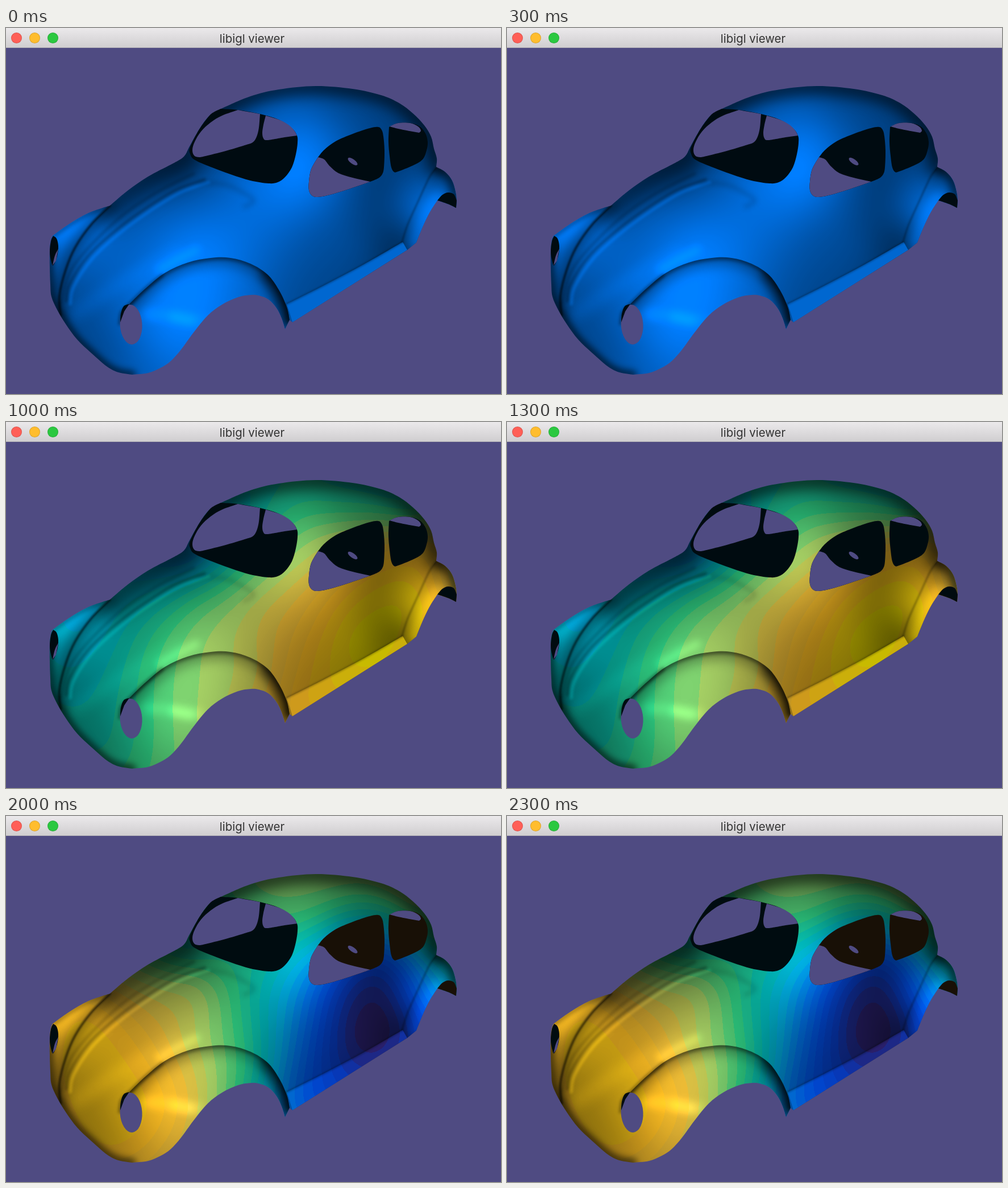
An HTML page with a canvas that plays this animation: 871 by 643 pixels, repeating every 2500 ms.

```html
<!DOCTYPE html>
<html lang="en">
<head>
<meta charset="utf-8">
<title>libigl viewer</title>
<style>
html, body { margin: 0; width: 100%; height: 100%; overflow: hidden; background: #4f4b82; }
canvas { position: absolute; left: 0; top: 0; }
.bar { position: absolute; left: 0; top: 0; width: 871px; height: 34px; background: linear-gradient(#ebe9eb, #d0ced0); border-bottom: 1px solid #b4b2b6; }
.bar i { position: absolute; top: 8px; width: 17px; height: 17px; border-radius: 50%; border: 1px solid #0002; background-clip: border-box; }
.bar span { position: absolute; left: 0; width: 866px; top: 5px; text-align: center; font: 20.4px/27px Inter, sans-serif; color: #333; }
</style>
</head>
<body>
<canvas id="stage" width="871" height="643"></canvas>
<div class="bar">
  <i style="left:9px;background:#ff5f57"></i>
  <i style="left:41px;background:#ffbd2e"></i>
  <i style="left:73px;background:#2bc840"></i>
  <span>libigl viewer</span>
</div>
<script>
const W = 871, H = 643, STEP = 500, BANDS = 28, UNIT = 170, BG = '#4f4b82';

function layer() {
  const c = document.createElement('canvas');
  c.width = W; c.height = H;
  return c.getContext('2d');
}

// Smooth runs of points, joined by corners.
function shape(...runs) {
  const path = new Path2D();
  runs.forEach((a, r) => {
    const n = a.length / 2;
    const at = i => { i = Math.max(0, Math.min(n - 1, i)); return [a[2 * i], a[2 * i + 1]]; };
    r ? path.lineTo(a[0], a[1]) : path.moveTo(a[0], a[1]);
    for (let i = 0; i < n - 1; i++) {
      const p = at(i - 1), q = at(i), s = at(i + 1), t = at(i + 2);
      path.bezierCurveTo(q[0] + (s[0] - p[0]) / 6, q[1] + (s[1] - p[1]) / 6,
        s[0] - (t[0] - q[0]) / 6, s[1] - (t[1] - q[1]) / 6, s[0], s[1]);
    }
  });
  return path;
}

function oval(...args) {
  const path = new Path2D();
  path.ellipse(...args, 0, 7);
  return path;
}

// Outlines
const leftTop = [82,365, 110,345, 145,325, 183,312];
const hoodTop = [183,312, 215,285, 250,261, 290,240, 308,230, 316,222, 323,208, 340,178, 357,155, 378,142];
const roof = [378,142, 430,120, 480,108, 545,102, 610,107, 660,118, 692,132, 716,150, 736,171, 748,191, 753,212, 758,229, 757,244];
const rearTop = [757,244, 773,253, 785,268, 791,287, 793,303, 792,316];
const rearArch = [759,303, 745,325, 733,350, 722,377];
const wheelArch = [491,529, 485,510, 476,492, 462,477, 445,470, 430,469, 408,473, 380,486, 355,505, 330,535, 308,565, 290,585, 272,597, 250,606, 222,609];
const nose = [222,609, 198,605, 178,595, 150,571, 125,547, 105,520, 90,495, 80,472, 78,450, 77,420, 77,390, 79,373, 82,365];
const hoodEdge = [183,312, 150,345, 122,385, 105,425, 94,470, 96,505];
const crease = [215,487, 245,458, 280,430, 320,412, 360,404, 395,404, 430,414, 460,433, 480,460, 494,490, 499,513];
const ridge = [106,480, 112,450, 145,400, 195,354, 250,314, 300,284, 350,266];
const sillTop = [494,485, 560,452, 630,415, 698,376];
const rearSeam = [697,376, 707,345, 725,305, 745,262, 757,244];

const body = shape(leftTop, hoodTop, roof, rearTop, [792,316, 777,309, 759,303], rearArch, [706,390], [504,517], [499,513], wheelArch, nose);
const fender = shape(crease, wheelArch, [205,606, 190,560, 195,520, 215,487]);
const leftFender = shape(leftTop, hoodEdge, nose.slice(12));
const rearFender = shape(rearTop, rearArch, [706,390], rearSeam);
const sill = shape(sillTop, [706,390], [504,517], [499,500]);

const windshield = shape([378,142, 408,144, 447,151, 480,161, 503,176, 512,189, 513,202, 510,222, 503,245, 491,262, 478,271, 462,273, 430,268, 395,257, 355,242, 331,231, 324,221, 324,209, 340,178, 357,155, 367,147, 378,142]);
const paneLeft = shape([408,144, 447,151], [447,151, 445,175, 441,191, 434,201, 420,206, 390,215, 355,224, 340,227, 331,224, 328,214, 332,200, 343,182, 360,166, 380,154, 408,144]);
const paneRight = shape([457,154, 480,161, 497,170, 507,180, 512,189], [490,192, 460,197, 453,194, 451,184, 453,170, 457,154]);
const sideLow = [641,270, 600,284, 570,293, 548,297, 538,294, 533,285, 533,270, 537,248, 549,227];
const sideWin = shape([549,227, 560,214, 580,199, 610,186, 640,176, 655,174, 661,179, 664,190, 666,215, 665,245, 662,257, 655,264, 641,270], sideLow);
const sideGap = shape([549,227, 560,231, 570,243, 585,255, 610,263, 641,270], sideLow);
const rearWin = shape([674,174, 690,167, 712,167, 728,173, 738,185, 742,200, 740,215, 733,231, 715,242, 690,252, 683,253, 678,245, 675,225, 673,200, 674,174]);
const rearGap = shape([675,173, 690,167, 711,167, 725,173, 730,180, 727,184], [710,181, 690,177, 675,173]);
const innerArch = shape([759,303, 768,293, 778,289, 788,292, 793,303], [792,316, 777,309, 759,303]);
const lampLeft = shape([83,365, 89,370, 92,383, 90,401, 83,417, 79,408, 77,393, 79,374, 83,365]);
const lampLeftGap = shape([92,388, 86,400, 82,417], [88,409, 92,388]);
const lamp = oval(220, 521, 19.5, 35, -.06);
const lampShadow = shape([216,485, 207,489, 202,502, 201,517], [208,498, 216,486]);
const mirror = oval(610, 234.5, 10, 4, .62);

// Places on the car where brightness and every mode are known.
const sites = [110,460, 180,570, 130,345, 220,370, 318,235, 330,300, 290,510, 330,385, 440,440, 450,330, 520,250, 535,185,
  410,130, 580,125, 710,155, 668,200, 660,275, 540,360, 625,385, 510,495, 695,370, 735,315, 780,268, 745,225];
const light = [.62,.62,.85,.76,.48,.7,1,.97,.78,.86,1,.86,.55,.58,.46,.52,.5,.68,.53,.6,.44,.8,.58,.46];
const modes = [
  { at: Array(24).fill(.3), front: '#000b11', side: '#000b11' },
  { at: [0,.01,.16,.14,.27,.26,.15,.27,.31,.33,.43,.55,.62,.64,.75,.61,.53,.4,.48,.38,.56,.67,.78,.74],
    front: '#060e0d', side: '#1a0f06' },
  { at: [.48,.54,.42,.52,.37,.55,.64,.66,.75,.74,.72,.64,.48,.55,.58,.74,.91,.86,.98,.87,.96,.92,.78,.82],
    front: '#000b10', side: '#000b0f' },
  { at: [.4,.42,.46,.43,.52,.45,.43,.45,.47,.51,.72,.92,.98,.99,.91,.82,.53,.51,.5,.49,.45,.38,.34,.46],
    front: '#000d0f', side: '#000c0f' },
  { at: [.9,.9,.88,.84,.54,.68,.84,.72,.52,.49,.43,.56,.62,.64,.64,.42,.13,.25,.02,.28,.08,.28,.46,.5],
    front: '#000c10', side: '#181006' }
];

// Smooth surface through the values at the sites.
function surface(values) {
  const n = values.length, mean = values.reduce((a, b) => a + b) / n;
  const near = (x, y, i) => {
    const r = Math.hypot(x - sites[2 * i], y - sites[2 * i + 1]) / 90;
    return (1 + r) * Math.exp(-r);
  };
  const rows = values.map((v, j) => [...values.map((_, i) => near(sites[2 * j], sites[2 * j + 1], i)), v - mean]);
  for (let i = 0; i < n; i++)
    for (let j = 0; j < n; j++) {
      if (j === i) continue;
      const f = rows[j][i] / rows[i][i];
      for (let k = i; k <= n; k++) rows[j][k] -= f * rows[i][k];
    }
  const weight = rows.map((r, i) => r[n] / r[i]);

  const cell = 4, cols = Math.ceil(W / cell) + 1, lines = Math.ceil(H / cell) + 1;
  const grid = Float32Array.from({ length: cols * lines }, (_, k) => {
    const x = k % cols * cell, y = Math.floor(k / cols) * cell;
    return weight.reduce((s, w, i) => s + w * near(x, y, i), mean);
  });
  return (x, y) => {
    const i = Math.floor(x / cell), j = Math.floor(y / cell), u = x / cell - i, v = y / cell - j, k = j * cols + i;
    return (grid[k] * (1 - u) + grid[k + 1] * u) * (1 - v) + (grid[k + cols] * (1 - u) + grid[k + cols + 1] * u) * v;
  };
}

// Layer whose pixels come from a rule (x, y, offset) => [r, g, b].
function plot(rule) {
  const g = layer(), img = g.createImageData(W, H);
  for (let y = 0, o = 0; y < H; y++)
    for (let x = 0; x < W; x++, o += 4) {
      const c = rule(x, y, o);
      for (let k = 0; k < 3; k++) img.data[o + k] = c[k];
      img.data[o + 3] = 255;
    }
  g.putImageData(img, 0, 0);
  return g;
}

// Brightness map; UNIT stands for full colour, more is a highlight.
function makeShade() {
  const level = surface(light);
  const g = plot((x, y) => Array(3).fill(UNIT * level(x, y)));
  const soft = (pts, tone, alpha, width, blur, clip) => {
    g.save();
    if (clip) g.clip(clip);
    g.filter = `blur(${blur}px)`;
    g.strokeStyle = `rgba(${tone},${tone},${tone},${alpha})`;
    g.lineWidth = width;
    g.lineCap = g.lineJoin = 'round';
    g.stroke(shape(pts));
    g.restore();
  };
  const dark = (...a) => soft(a[0], 0, ...a.slice(1));
  const glow = (...a) => soft(a[0], 255, ...a.slice(1));

  dark(hoodTop.slice(0, 12), .55, 60, 18);
  dark(hoodEdge, .3, 24, 9);
  dark(roof, .6, 30, 12);
  dark(ridge, .3, 4, 2);
  g.save();
  g.translate(7, 5);
  glow(ridge, .2, 5, 2);
  g.restore();
  dark([96,485, 118,420, 190,342, 260,292, 330,256], .22, 5, 2.5);
  dark([340,272, 385,275, 415,288, 436,303, 420,314], .15, 7, 4);
  glow([125,500, 200,450, 300,395], .1, 26, 10);
  glow([270,425, 300,408, 335,390], .45, 12, 7);

  glow(leftTop, .25, 40, 12, leftFender);
  dark(leftTop, .4, 8, 4, leftFender);
  dark(crease, .3, 30, 10, fender);
  dark(crease, .5, 8, 3, fender);
  dark(crease.slice(14), .55, 24, 8, fender);
  glow([250,503, 285,505, 340,513], .3, 18, 8, fender);
  glow([295,508, 325,515], .4, 16, 7, fender);
  dark([200,520, 203,500, 215,487, 245,458, 275,434], .4, 5, 2.5);
  glow(rearArch, .25, 30, 8, rearFender);
  dark(rearTop, .55, 18, 7, rearFender);
  const tone = Math.round(UNIT * .82);
  g.fillStyle = `rgb(${tone},${tone},${tone})`;
  g.fill(sill);
  dark(hoodEdge, .6, 4, 1.5);
  dark(nose.slice(0, 22), .6, 14, 6);
  for (const seam of [sillTop, rearSeam]) dark(seam, .3, 3, 1.5);
  return g.getImageData(0, 0, W, H).data;
}

const stops = ['322682', '0a42dc', '0058ff', '007fff', '00afe8', '00bcb4', '32ce7e', 'a0cd64', 'e1b437', 'ffbe20', 'f5e400']
  .map(h => [0, 2, 4].map(k => parseInt(h.slice(k, k + 2), 16)));
const palette = Array.from({ length: BANDS }, (_, b) => {
  const p = b / (BANDS - 1) * (stops.length - 1), i = Math.min(Math.floor(p), stops.length - 2);
  return stops[i].map((c, k) => c + (p - i) * (stops[i + 1][k] - c));
});

function paint(mode, shade) {
  const value = surface(mode.at);
  const skin = plot((x, y, o) => {
    const b = Math.max(0, Math.min(BANDS - 1, Math.floor(value(x, y) * BANDS)));
    return palette[b].map(c => c * shade[o] / UNIT);
  });
  const g = layer();
  const fill = (color, ...paths) => { g.fillStyle = color; paths.forEach(p => g.fill(p)); };
  g.fillStyle = BG;
  g.fillRect(0, 0, W, H);
  fill(g.createPattern(skin.canvas, 'no-repeat'), body);
  fill(mode.front, windshield, lampLeft);
  fill(mode.side, sideWin, rearWin, innerArch);
  fill(BG, paneLeft, paneRight, sideGap, rearGap, mirror, lampLeftGap, lamp);
  fill(mode.front, lampShadow);
  return g.canvas;
}

const stage = document.getElementById('stage').getContext('2d');
const shade = makeShade();
const views = modes.map(m => paint(m, shade));
const start = performance.now();

function draw() {
  const t = Math.max(0, performance.now() - start);
  stage.drawImage(views[Math.floor(t / STEP) % views.length], 0, 0);
  requestAnimationFrame(draw);
}
draw();
</script>
</body>
</html>
```
